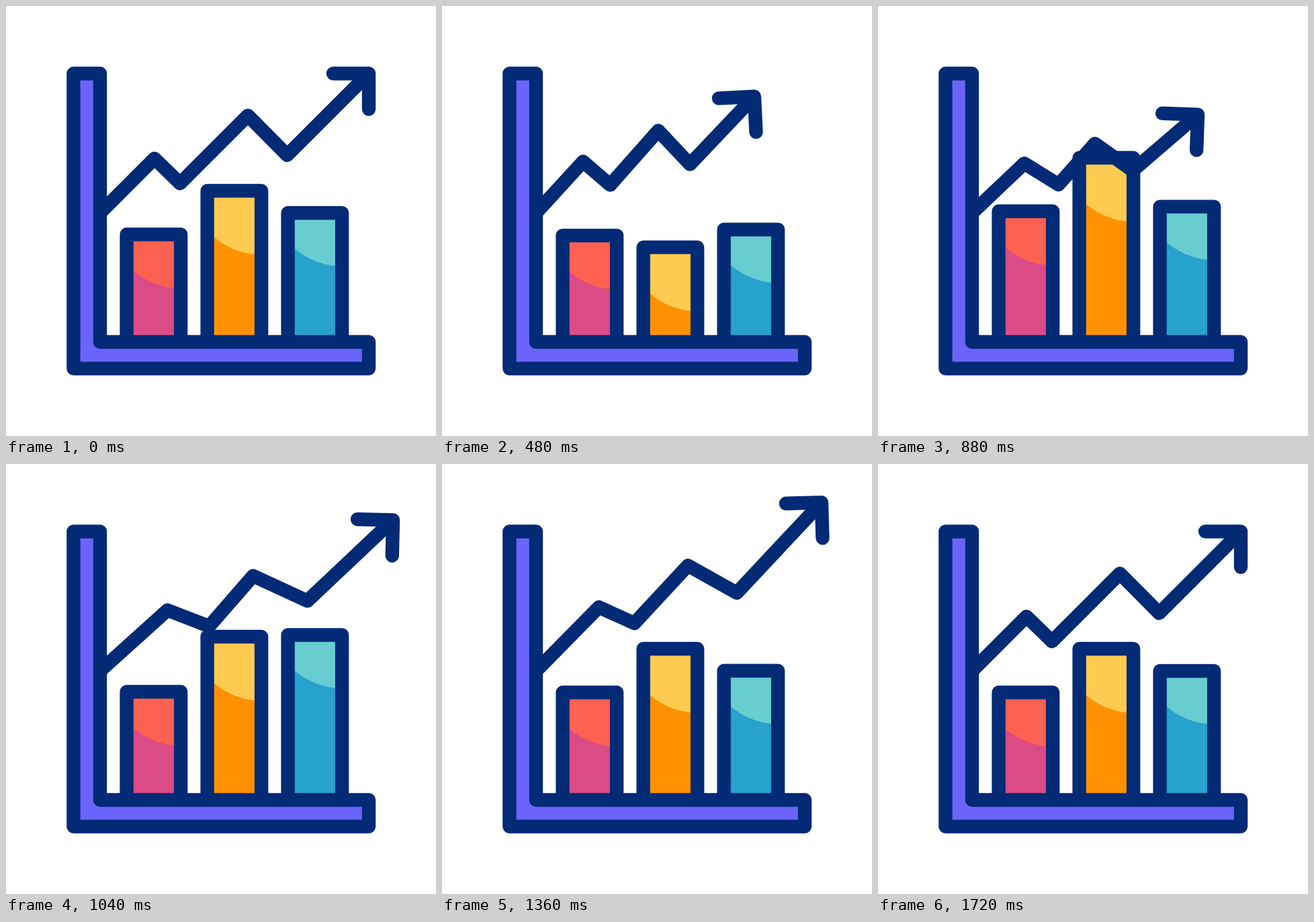
Recreate the animation shown at these times as an HTML page. Size 640 by 640 pixels, loop 2.12 s.

```html
<!DOCTYPE html>
<html lang="en">
<head>
<meta charset="utf-8">
<title>Growth chart</title>
<style>
  html, body { margin: 0; width: 100%; height: 100%; overflow: hidden; background: #fff; }
  svg { display: block; width: 100%; height: 100%; }
  .ink { stroke: #032a75; stroke-width: 20.4; stroke-linecap: round; stroke-linejoin: round; }
</style>
</head>
<body>
<svg viewBox="0 0 640 640">
  <clipPath id="floor"><rect width="640" height="500"/></clipPath>
  <g id="bars" clip-path="url(#floor)"></g>
  <path class="ink" fill="#6a64fa" d="M100.4 100.5H140V500H540V539.6H100.4Z"/>
  <path id="line" class="ink" fill="none"/>
</svg>
<script>
const LOOP = 2120, STEP = 40, HEAD = 53, WIDTH = 80.5;

// Each bar sinks by `drop`, shoots up to `rise` above rest, then settles
const bars = [
  { x: 179.6, top: 340, split: 54, hi: '#ff6151', lo: '#db4c86', drop: 46, rise: 61, times: [40, 285, 725, 1065] },
  { x: 299.6, top: 275, split: 69, hi: '#fdcb50', lo: '#ff9100', drop: 85, rise: 51, times: [135, 502, 842, 1172] },
  { x: 419.6, top: 308, split: 53, hi: '#67cdd0', lo: '#27a2cc', drop: 67, rise: 54, times: [340, 680, 1020, 1375] }
];

// Trend line corners, the last one being the arrow tip
const rest = [[221, 227], [259, 264], [360, 163], [418.5, 222], [540, 100.5]];
const low  = [[200, 236.5], [242.5, 269], [288, 210], [325, 250.5], [398, 172]];
const high = [[241.5, 209.5], [304, 230], [370, 148], [452, 184], [581, 46]];

// Sideways motion leads, vertical motion trails behind it
const timing = [
  [215, 725, 720, 1075, 1120, 1680],
  [310, 660, 819, 1165, 1220, 1700]
];
const tilt = [[180, 0], [680, -4.4], [900, 2.2], [1360, -1.7], [1700, 0]];

const mix = (a, b, k) => a + (b - a) * k;

function ease(t, from, to) {
  const s = Math.min(1, Math.max(0, (t - from) / (to - from)));
  return s * s * (3 - 2 * s);
}

// Rest to low, low to high, and back to rest
function swing(t, [a, b, c, d, e, f], home, down, up) {
  const v = mix(mix(home, down, ease(t, a, b)), up, ease(t, c, d));
  return mix(v, home, ease(t, e, f));
}

function follow(t, keys) {
  let v = keys[0][1];
  for (let i = 1; i < keys.length; i++) {
    v = mix(v, keys[i][1], ease(t, keys[i - 1][0], keys[i][0]));
  }
  return v;
}

const group = document.getElementById('bars');
const line = document.getElementById('line');

for (const b of bars) {
  const { x, top, split } = b;
  const box = `x="${x}" y="${top}" width="${WIDTH}" height="400"`;
  group.insertAdjacentHTML('beforeend', `<g>
    <rect ${box} fill="${b.hi}"/>
    <path fill="${b.lo}" d="M${x + 10} ${top + split}q26 22 60.5 26V${top + 400}h-60.5z"/>
    <rect class="ink" fill="none" ${box}/></g>`);
  b.node = group.lastElementChild;
}

function draw(t) {
  for (const b of bars) {
    const [a, m, n, z] = b.times;
    const y = swing(t, [a, m, m, n, n, z], 0, b.drop, -b.rise);
    b.node.setAttribute('transform', `translate(0 ${y})`);
  }
  const points = rest.map((p, i) => p.map((v, axis) =>
    swing(t, timing[axis], v, low[i][axis], high[i][axis])));
  const [x, y] = points[points.length - 1];
  const angle = follow(t, tilt) * Math.PI / 180;
  const c = HEAD * Math.cos(angle), s = HEAD * Math.sin(angle);
  line.setAttribute('d', `M140 308L${points.join(' ')}M${x - c} ${y - s}L${x} ${y}L${x - s} ${y + c}`);
}

const start = performance.now();
function tick() {
  const t = (performance.now() - start) % LOOP;
  draw(Math.floor(t / STEP) * STEP);
  requestAnimationFrame(tick);
}
tick();
</script>
</body>
</html>
```
